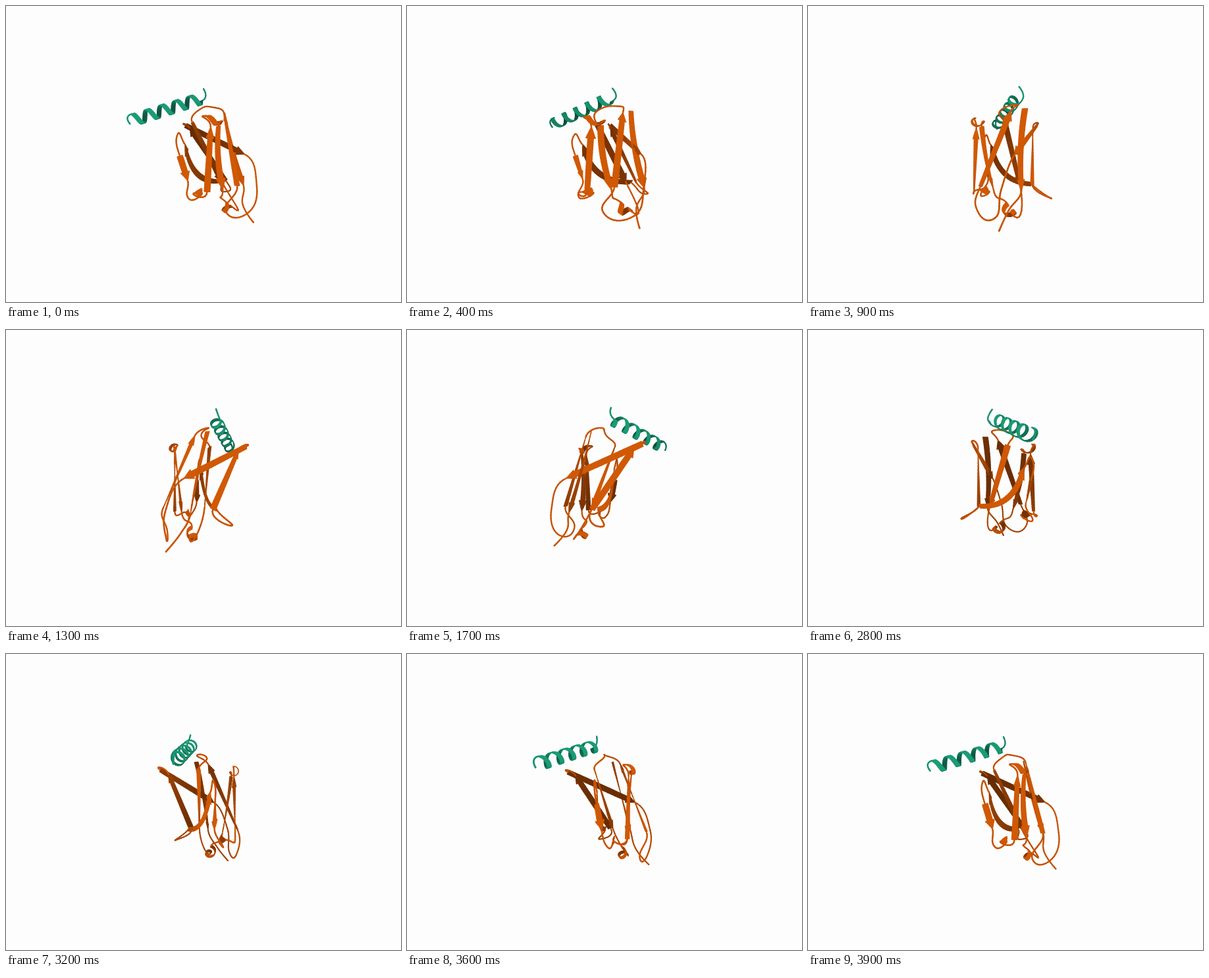
Write an HTML page with a canvas that moves like this. It is 600 px wide and 450 px high and loops after 4000 ms.

```html
<!DOCTYPE html>
<html lang="en">
<head>
<meta charset="utf-8">
<title>Rotating ribbon model</title>
<style>
html, body { margin: 0; width: 100%; height: 100%; overflow: hidden; background: #fefdfe; }
canvas { display: block; width: 600px; height: 450px; }
</style>
</head>
<body>
<canvas id="stage" width="600" height="450"></canvas>
<script>
const ctx = document.getElementById('stage').getContext('2d');
const PAPER = '#fefdfe', ORANGE = [208, 89, 5], GREEN = [27, 156, 118];
const LOOP = 4000, STEP = 100, EYE = 520;

// Vectors: x right, y down, z away from the viewer at the start
const add = (a, b, k = 1) => a.map((v, i) => v + b[i] * k);
const scale = (a, k) => a.map(v => v * k);
const dot = (a, b) => a[0] * b[0] + a[1] * b[1] + a[2] * b[2];
const cross = (a, b) => [
  a[1] * b[2] - a[2] * b[1],
  a[2] * b[0] - a[0] * b[2],
  a[0] * b[1] - a[1] * b[0]
];
const len = a => Math.hypot(...a);
const unit = a => scale(a, 1 / (len(a) || 1));
const clamp = (v, lo, hi) => Math.min(hi, Math.max(lo, v));
const range = n => Array.from({ length: n }, (_, i) => i);

const parts = [];

function facet(p, q, pw, qw, normal, color) {
  parts.push({
    pts: [add(p, pw), add(q, qw), add(q, qw, -1), add(p, pw, -1)],
    normal, color
  });
}

// Flat arrow with the natural right-handed twist. deg turns its outer face
// about the vertical, bow bends it sideways. Returns its two ends.
function strand(deg, from, to, bow = 0) {
  const n = 18, twist = 0.7, a = deg * Math.PI / 180;
  const axis = add(to, from, -1), t = unit(axis);
  const w = unit(cross(t, [Math.cos(a), 0, Math.sin(a)])), face = cross(w, t);
  const head = clamp(Math.round(n * (1 - 13 / len(axis))), 0, n - 1);
  const at = s => add(add(from, axis, s), w, bow * 4 * s * (1 - s));
  const turn = (u, v, s) => {
    const r = twist * (s - 0.5);
    return add(scale(u, Math.cos(r)), v, Math.sin(r));
  };
  const side = (i, inHead) => scale(turn(w, scale(face, -1), i / n),
    inHead ? 0.4 + 6.2 * (n - i) / (n - head) : 3.9);
  for (const i of range(n)) {
    const h = i >= head;
    facet(at(i / n), at((i + 1) / n), side(i, h), side(i + 1, h),
      turn(face, w, (i + 0.5) / n), ORANGE);
  }
  return { tail: { pos: from, dir: scale(t, -1) }, head: { pos: to, dir: t } };
}

// Ribbon wound right-handed around an axis. Returns its two ends.
function helix(from, to, r, turns, half, color) {
  const axis = add(to, from, -1), u = unit(axis), up = [0, -1, 0];
  const e1 = unit(add(up, u, -dot(up, u))), e2 = cross(u, e1);
  const radial = s => {
    const f = s * turns * 2 * Math.PI;
    return add(scale(e1, Math.cos(f)), e2, Math.sin(f));
  };
  const at = s => add(add(from, axis, s), radial(s), r);
  const n = Math.ceil(turns * 20), w = scale(u, half);
  for (const i of range(n)) {
    facet(at(i / n), at((i + 1) / n), w, w, radial((i + 0.5) / n), color);
  }
  return { tail: { pos: at(0), dir: scale(u, -1) }, head: { pos: at(1), dir: u } };
}

// Tube between two ends, leaving and arriving along their directions
function link(a, b, via = [], color = ORANGE) {
  const stops = [a.pos, ...via, b.pos], last = stops.length - 1;
  const slope = i => i === 0 ? a.dir
    : i === last ? scale(b.dir, -1)
    : unit(add(stops[i + 1], stops[i - 1], -1));
  for (const i of range(last)) {
    const p = stops[i], q = stops[i + 1];
    const reach = via.length ? 0.4 * len(add(q, p, -1)) : 6 + 0.5 * len(add(q, p, -1));
    const c = add(p, slope(i), reach), d = add(q, slope(i + 1), -reach);
    const at = s => p.map((_, k) => (1 - s) ** 3 * p[k] + 3 * s * (1 - s) ** 2 * c[k]
      + 3 * s * s * (1 - s) * d[k] + s ** 3 * q[k]);
    for (const j of range(10)) parts.push({ pts: [at(j / 10), at((j + 1) / 10)], color });
  }
}
const loose = pos => ({ pos, dir: [0, 0, 0] });

const rod = helix([-106, -52, 1], [-4, -87, 18], 9.5, 4.7, 3.2, GREEN);
link(rod.tail, loose([-112, -46, 2]), [], GREEN);
link(rod.head, loose([0, -103, 21]), [], GREEN);

// Outer sheet
const left = strand(-65, [5, 52, -48], [10, -37, -45]);
const middle = strand(-65, [21, -39, -38], [28, 50, -22], 4);
const long = strand(-45, [47, 44, -42], [32, -60, 2]);
const right = strand(-40, [33, -65, 23], [62, 48, 12], 4);

// Inner sheet
const curved = strand(130, [26, 44, 34], [-27, -14, -19], 19);
const inner = strand(135, [-17, -48, 2], [28, 42, 16]);
const rear = strand(60, [36, 43, 33], [-22, -42, 48]);
const slant = strand(60, [-30, -48, 58], [62, 0, 3]);

// Edge pieces and single turns
const edge = strand(-100, [-34, 3, -28], [-23, 38, -24]);
const chip = strand(-45, [-3, 56, -26], [-12, 55, -38]);
const cap = helix([4, -46, -46], [24, -48, -42], 7, 0.7, 3.8, ORANGE);
const foot = helix([29, 77, -4], [41, 87, 3], 7, 1.1, 3.4, ORANGE);

link(rear.head, slant.tail);
link(rear.tail, curved.tail, [[37, 64, 61]]);
link(slant.head, long.tail, [[78, 46, -18], [66, 84, -24], [31, 80, -45]]);
link(curved.head, edge.tail, [[-37, -29, -27]]);
link(edge.head, chip.tail, [[-20, 64, -36]]);
link(chip.head, left.tail);
link(long.head, inner.tail, [[16, -73, 16], [-8, -65, -8]]);
link(left.head, cap.tail);
link(cap.head, middle.tail);
link(middle.head, foot.tail);
link(foot.head, inner.head);
link(right.head, loose([73, 100, -20]), [[59, 76, -5]]);

function draw(angle) {
  const s = Math.sin(angle), c = Math.cos(angle), view = [s, 0, -c];
  const project = p => {
    const near = dot(p, view), k = EYE / (EYE - near);
    return { x: 300 + (p[0] * c + p[2] * s) * k, y: 225 + p[1] * k, near, k };
  };
  // Outer faces are light, inner and distant ones dark
  const list = parts.map(({ pts, normal, color }) => {
    const p = pts.map(project);
    const near = p.reduce((sum, q) => sum + q.near, 0) / p.length;
    const facing = normal ? dot(normal, view) : 0.3;
    const light = clamp(0.86 + 0.3 * facing, 0.58, 1) * clamp(1 + near / 300, 0.7, 1);
    return { p, near, fill: `rgb(${color.map(v => Math.round(v * light))})` };
  }).sort((a, b) => a.near - b.near);

  ctx.fillStyle = PAPER;
  ctx.fillRect(0, 0, 600, 450);
  ctx.lineCap = ctx.lineJoin = 'round';
  for (const { p, fill } of list) {
    const flat = p.length > 2;
    ctx.beginPath();
    p.forEach(q => ctx.lineTo(q.x, q.y));
    ctx.strokeStyle = ctx.fillStyle = fill;
    if (flat) {
      ctx.closePath();
      ctx.fill();
    }
    ctx.lineWidth = (flat ? 1.4 : 2.3) * p[0].k;
    ctx.stroke();
  }
}

function tick() {
  const step = Math.floor(performance.now() % LOOP / STEP);
  draw(step * STEP / LOOP * 2 * Math.PI);
  requestAnimationFrame(tick);
}
tick();
</script>
</body>
</html>
```
